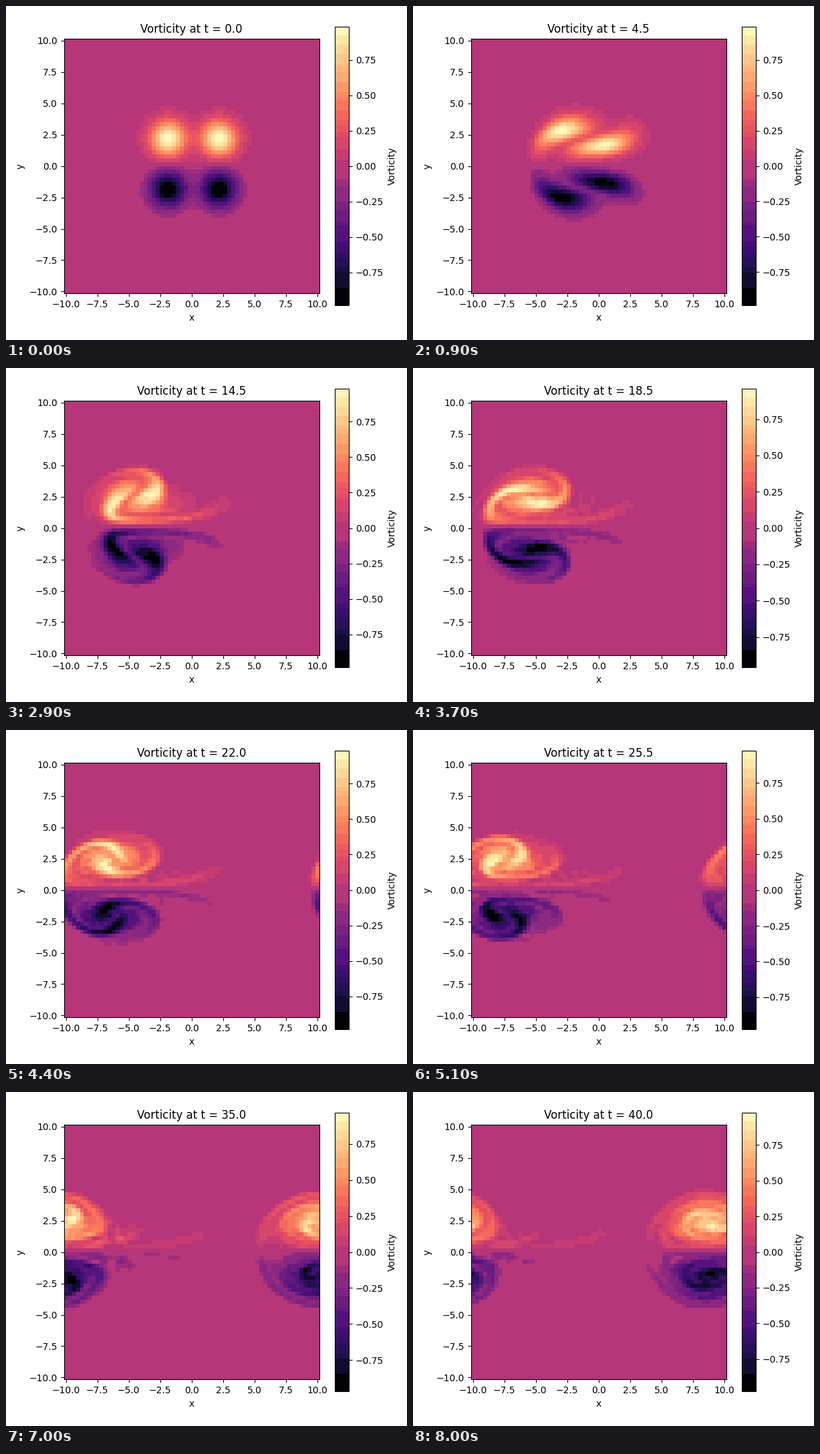
Write a matplotlib script that moves like this. It is 600 px wide and 500 px high and loops after 8.1 s.

```python
import numpy as np
import matplotlib.pyplot as plt
from matplotlib.animation import FuncAnimation
from matplotlib.colors import ListedColormap

N, BOX = 64, 20.0
FRAMES, FRAME_TIME, SUBSTEPS = 81, 0.5, 5
DT = FRAME_TIME / SUBSTEPS
VISCOSITY = 0.001

grid = np.arange(N) * BOX / N - BOX / 2
X, Y = np.meshgrid(grid, grid)
k = 2 * np.pi * np.fft.fftfreq(N, BOX / N)
KX, KY = np.meshgrid(np.abs(k[:N // 2 + 1]), k)
K2 = KX**2 + KY**2
INV_K2 = np.divide(1, K2, out=np.zeros_like(K2), where=K2 > 0)
KEEP = (KX < 2 / 3 * np.abs(k).max()).astype(float)


def to_grid(spectrum):
    return np.fft.irfft2(spectrum, s=(N, N))


def tendency(w):
    u = to_grid(-1j * KY * INV_K2 * w)
    v = to_grid(1j * KX * INV_K2 * w)
    advection = u * to_grid(1j * KX * w) + v * to_grid(1j * KY * w)
    return -KEEP * np.fft.rfft2(advection) - VISCOSITY * K2 * w


def rk4_step(w):
    a = tendency(w)
    b = tendency(w + DT / 2 * a)
    c = tendency(w + DT / 2 * b)
    d = tendency(w + DT * c)
    return w + DT / 6 * (a + 2 * b + 2 * c + d)


def simulate():
    field = sum(np.sign(cy) * np.exp(-((X - cx)**2 + (Y - cy)**2) / 2)
                for cx in (-2, 2) for cy in (-2, 2))
    w = np.fft.rfft2(field)
    fields = [field]
    for _ in range(FRAMES - 1):
        for _ in range(SUBSTEPS):
            w = rk4_step(w)
        fields.append(to_grid(w))
    return fields


MAGMA = plt.get_cmap("magma")(np.arange(256), bytes=True)[:, :3].astype(int)
BIN_KEYS = MAGMA[:, 0] // 32 * 256 + MAGMA[:, 1] // 16 * 16 + MAGMA[:, 2] // 32
BINS = np.unique(BIN_KEYS, return_inverse=True)[1]


def banded_magma(field, limit):
    """Merge similar magma shades into bands, each the mean of the shades in use."""
    shade = np.clip((field / limit + 1) * 128, 0, 255).astype(int)
    weight = 1.0 + np.bincount(shade.ravel(), minlength=256)
    weight[0] += 70  # black lines and text share the darkest band
    total = np.bincount(BINS, weight)
    bands = [np.bincount(BINS, weight * MAGMA[:, c]) / total for c in range(3)]
    return ListedColormap(np.stack(bands, axis=1)[BINS] / 255)


fields = simulate()
ticks = np.linspace(-10, 10, N)

fig, ax = plt.subplots(figsize=(6, 5), dpi=100)
mesh = ax.pcolormesh(ticks, ticks, fields[0], cmap="magma", shading="nearest")
ax.set_aspect("equal")
ax.set_xlabel("x")
ax.set_ylabel("y")
fig.colorbar(mesh, ax=ax, label="Vorticity")


def draw(i):
    field = fields[i]
    limit = np.abs(field).max()
    mesh.set_array(field)
    mesh.set_cmap(banded_magma(field, limit))
    mesh.set_clim(-limit, limit)
    ax.set_title(f"Vorticity at t = {i * FRAME_TIME:.1f}")
    fig.subplots_adjust(left=0.125, right=0.9, bottom=0.11, top=0.88)
    fig.tight_layout()
    return [mesh]


anim = FuncAnimation(fig, draw, frames=FRAMES, interval=100, repeat=True,
                     repeat_delay=0, blit=False)
plt.show()
```
